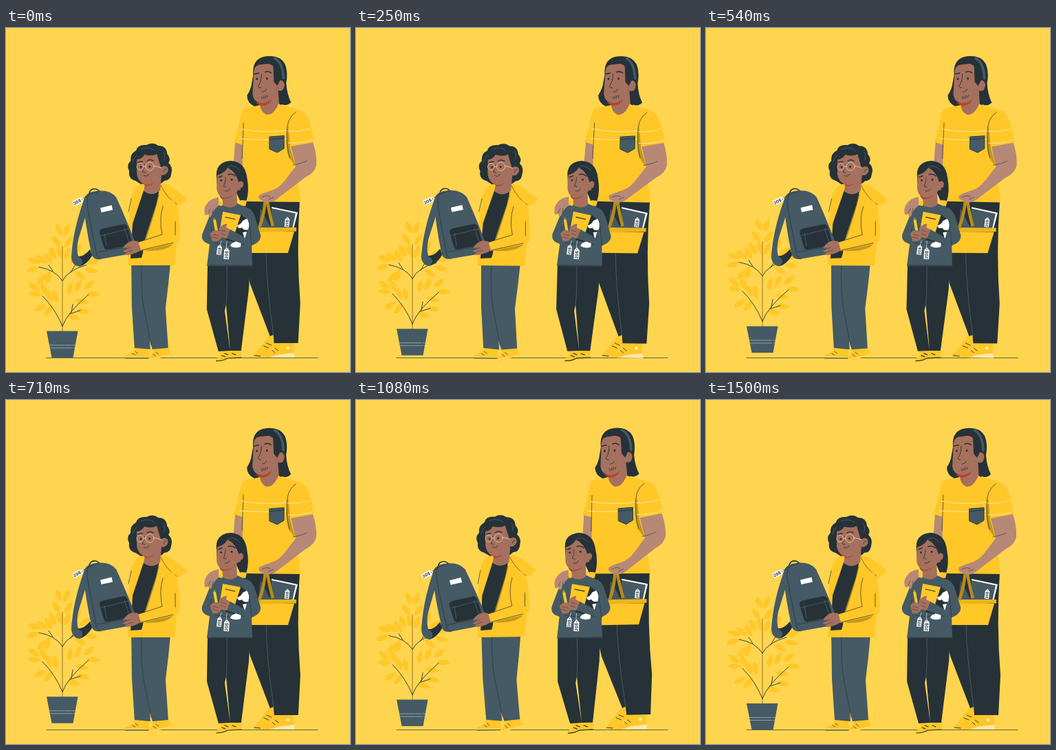
Write an HTML page that moves like this. It is 500x500 px and loops after 1540 ms.

```html
<!DOCTYPE html>
<html lang="en">
<head>
<meta charset="utf-8">
<title>School shopping</title>
<style>
html, body { margin: 0; height: 100%; overflow: hidden; background: #ffd54f }
svg { display: block; width: 100vw; height: 100vh }
.dark { fill: #263238 }
.slate { fill: #455a64 }
.gold { fill: #ffc727 }
.shade { fill: #c4981d }
.face { fill: #a5705d }
.skin { fill: #b78876 }
.red { fill: #b5442f }
.white { fill: #fff }
.ink, .pale, .grey { fill: none; stroke: #263238; stroke-width: .9; stroke-linecap: round; stroke-linejoin: round }
.pale { stroke: #ffebb0 }
.grey { stroke: #607580; stroke-width: .6 }
text { font: 700 6px Inter, Arial, sans-serif; text-anchor: middle; fill: #263238 }
</style>
</head>
<body>
<svg viewBox="0 0 500 500">
<defs>
  <path id="leaf" class="gold" d="M-10 0Q-2-8 10 0Q-2 8-10 0"/>
  <g id="tag">
    <path class="white" d="M-7-3.8H6L10 0L6 3.8H-7Z"/>
    <circle class="slate" cx="7.2" r=".8"/>
    <text y="2.2" x="-.8">20$</text>
  </g>
</defs>

<path class="ink" d="M59 479.5H453" style="stroke-width:.7"/>

<g id="plant">
  <g id="leaves"></g>
  <path class="ink" d="M82 441V318" style="stroke:#8a6d1f"/>
  <path class="ink" d="M82 368Q72 352 48 348M68 354L62 345M82 368Q90 352 117 345M94 356L101 344M82 434Q72 409 53 390M82 434Q89 414 120 388M93 416L108 411M95 414L97 402"/>
  <path class="slate" d="M59 441H104.500L97.500 479.500H66.500Z"/>
  <path class="pale" d="M63 461.500H101M64 465.500H100" stroke-dasharray="22 1 9 2" style="stroke:#b4bec3;stroke-width:.7"/>
</g>

<g id="father">
  <path class="skin" d="M333 164L345 168V212L330 204Z"/>
  <path class="gold" d="M361 475L384 446L395 445L393 462L369 479L362 478Z"/>
  <path class="gold" d="M391 457H418L420 479H372Q375 471 389 468Z"/>
  <path class="white" d="M395 475L419 472L420 479H382Q388 478 395 475Z" opacity=".6"/>
  <circle class="white" cx="410" cy="465" r="2"/>
  <path class="ink" d="M375 462L382 465M379 458L386 461M387 468L391 472M391 465L396 469M361 476L370 477"/>
  <path class="dark" d="M345 249L427 250Q422 325 428 400L425 458L390 458L389 446L384 448L355 372L347 330Z"/>
  <path class="grey" d="M378 326Q379 375 389 446"/>
  <path class="dark" d="M359 68Q357 47 373 42Q396 37 405 52Q410 64 407 80Q408 96 414 108Q408 114 401 111Q393 119 380 114Q370 120 361 114Q350 109 350 98Q356 89 357 79Z"/>
  <path class="face" d="M369 105L395 88L397 114Q391 127 378 126Q369 121 369 114Z"/>
  <path class="red" d="M362 108Q374 111 386 101Q384 113 370 113Z"/>
  <path class="face" d="M360 62Q361 53 372 53L386 51Q391 62 392 79Q397 74 402 77Q407 82 402 90Q397 93 392 89Q389 106 374 109Q360 110 358 96Z"/>
  <path class="dark" d="M364 54Q378 48 388 55L389 78L394 84L398 76L400 57L389 45Z"/>
  <path class="ink" d="M390 44Q402 50 403 73" style="stroke:#455a64;stroke-width:3.500"/>
  <path class="ink" d="M360 67L367 65.500M376 64Q381 62 385 65" style="stroke-width:1.600"/>
  <ellipse class="dark" cx="364.500" cy="74" rx="1.400" ry="1.800"/><ellipse class="dark" cx="379" cy="73.500" rx="1.400" ry="1.800"/>
  <path class="ink" d="M371 67Q371 78 366 85Q367 87 370 87M372 93Q377 93 378 89M371 100L372 103M374 99V102M377 98L376 102M380 98L379 101"/>
  <path class="gold" d="M369 112L346 117Q341 121 338 142L331 166L344 170L343 252L428 253Q425 220 418 199L413 173L448 165Q441 129 432 122Q424 117 402 113L396 110Q388 128 378 126Q370 122 369 112Z"/>
  <path class="shade" d="M410 141Q404 168 411 188L421 202L413 173Z"/>
  <path class="ink" d="M421 122Q407 131 408 155Q408 174 412 188M345 138L343 190" style="stroke-width:.7"/>
  <path class="pale" d="M342 147Q374 153 407 149M409 150Q427 151 441 146M339 161Q373 164 407 161M410 167Q430 168 446 162"/>
  <path class="slate" d="M383 158L404 156.500V175L394 181L383 176Z"/>
  <path class="ink" d="M383 162L404 160M383 158L404 156.500V175L394 181L383 176Z"/>
  <path class="slate" d="M370 262L385 291H367Z"/>
  <path class="white" d="M386 260L424 268L418 292H386Z"/>
  <path class="slate" d="M386 262L421 269.500L416 292H384Z"/>
  <use href="#tag" transform="translate(408.500 283)rotate(-84)scale(.85)"/>
  <path class="gold" d="M359 296H419L410 327H355Z"/>
  <path d="M357 290H422V295.500L357 297Z" fill="#edb51c"/>
  <path d="M377 246Q376 270 368 291M379 246Q383 272 388 288" fill="none" stroke="#b98b17" stroke-width="4.500"/>
  <path class="skin" d="M414 172L446 166Q452 184 451 199Q449 210 435 217L397 246Q390 253 380 254L372 251Q365 248 368 243Q374 240 383 237Q396 234 405 222L421 201Z"/>
  <path class="ink" d="M417 199Q429 197 437 193M372 246Q379 242 384 245M382 249L389 246" style="stroke-width:.6"/>
</g>

<g id="boy">
  <path class="gold" d="M186 464L207 466L209 479H173Q174 475 186 470Z"/>
  <path class="gold" d="M213 464L236 462L240 476Q226 479 211 483Q206 482 207 479Q217 474 213 464Z"/>
  <path class="pale" d="M174 478.500H206M209 481.500L239 475"/>
  <path class="ink" d="M184 473L188 475M188 470L192 473M214 474L218 477M218 471L222 474M174 480H207" style="stroke-width:.7"/>
  <path class="slate" d="M182 332L239 342L236 373L232 407L236 465L213 467L209 453L210 467L187 465L183 405Z"/>
  <path class="ink" d="M197 345Q196 385 201 410L211 461" style="stroke-width:.6"/>
  <path class="gold" d="M197 226Q185 231 182 246L178 285L177 345H197L216 270L225 226Z"/>
  <path class="dark" d="M200 236L223 234L218 260L197 334L181 335L184 284Z"/>
  <path class="gold" d="M225 226Q234 225 245 234L263 248Q256 258 246 258Q250 263 251 280L245 345H197L201 310L218 257Z"/>
  <path class="ink" d="M225 229Q233 246 248 256M222 242Q217 264 203 307" style="stroke-width:.6"/>
  <path class="shade" d="M195 322L244 312Q237 324 206 324Z"/>
  <path class="gold" d="M231 248Q246 248 249 262Q254 290 252 307Q250 313 242 314L195 324L190 312L226 301Z"/>
  <path class="ink" d="M228 259Q222 278 227 300L193 311M196 323L243 312M246 281V301M178 267L182 248" style="stroke-width:.7"/>
  <path class="dark" d="M188 222Q177 219 179 208Q174 200 181 193Q180 182 189 178Q191 169 204 170Q214 165 221 171Q233 171 234 183Q240 190 236 196Q243 202 240 212Q239 222 230 222Q223 230 214 224L196 227Z"/>
  <path class="face" d="M203 220L226 212L224 236Q212 246 200 237Z"/>
  <path class="red" d="M199 226L217 220Q215 229 203 230Z"/>
  <path class="face" d="M190 191Q197 191 201 184Q213 187 219 183Q222 193 225 203Q231 198 235 203Q237 209 231 213Q226 215 224 212Q218 227 205 228Q192 226 190 212Z"/>
  <path class="grey" d="M196 176Q207 171 216 178M228 179Q233 186 229 192M184 195Q185 188 190 185"/>
  <path class="ink" d="M192 195L198 194M205 193Q209 190 214 193" style="stroke-width:1.500"/>
  <circle class="dark" cx="196" cy="202" r="1.500"/><circle class="dark" cx="208.500" cy="201.500" r="1.500"/>
  <path class="ink" d="M201 198Q200 206 198 209L202 210M200 214Q205 217 208 212M229 209Q230 204 233 205" style="stroke-width:.8"/>
  <g class="pale" style="stroke:#edc4a4"><circle cx="195" cy="201.500" r="5"/><circle cx="209" cy="201" r="6"/><path d="M200 201H203M215 200L226 203"/></g>

  <path class="slate" d="M113 250Q97 295 95 333Q96 346 107 347Q116 345 126 330L122 322Q112 335 105 332Q102 323 105 308L119 262Z"/>
  <path class="dark" d="M104 332Q113 333 122 322L125 331Q117 344 108 346Q116 338 104 332Z"/>
  <path class="ink" d="M121 241C121 232 135 231 137 241" style="stroke-width:1.600"/>
  <path class="slate" d="M112 254Q114 240 126 238Q149 233 160 246Q174 276 190 317Q192 326 182 328L137 336Q126 338 124 327Q116 290 112 254Z"/>
  <path class="ink" d="M121 240Q116 248 119 264L131 326Q132 334 138 336M133 326L188 316" style="stroke-width:.7"/>
  <path class="white" d="M137 261.500L153.500 257.500L155 264.500L138.500 268Z"/>
  <path class="dark" d="M136 298Q135 293 141 291.500L169 285.500Q175 284 177 290L183 310Q184 315 179 316L149 322Q143 323 142 318Z"/>
  <path class="grey" d="M138 302L178 292M143 299L146 317M172 291L179 312"/>
  <path class="ink" d="M112 248Q121 241 136 237" style="stroke-width:.7"/>
  <use href="#tag" transform="translate(104 252.500)rotate(-27)"/>
  <path class="face" d="M170 320Q176 310 185 309L192 310L196 323Q187 329 175 330Q171 328 177 325Q170 327 170 324Q173 321 178 319Z"/>
  <path class="ink" d="M177 325L184 323M171 323L181 319" style="stroke-width:.5"/>
</g>

<g id="girl">
  <path class="gold" d="M309 468L326 467L328 479Q318 480 312 485L306 484Q304 481 313 475Z"/>
  <path class="gold" d="M327 467L342 468L343 478L320 482Q315 481 326 474Z"/>
  <path class="ink" d="M306 484Q316 484 322 480L342 479M314 476L319 478M318 473L323 475M329 473L334 475" style="stroke-width:1.200"/>
  <path class="dark" d="M293 345L355 344L353 380L342 469H326L320 402L318 411L326 469L309 470L292 409Z"/>
  <path class="grey" d="M321 347Q322 378 320 402"/>
  <path class="dark" d="M306 218Q303 195 326 193Q347 194 350 217Q354 237 349 252L340 251L335 240L312 247Q306 235 306 218Z"/>
  <path class="slate" d="M313 256Q300 260 295 275L285 300Q283 311 296 314L292 346L358 346L357 316Q371 311 370 301L363 278Q359 263 350 261L336 255Q325 264 313 256Z"/>
  <path class="face" d="M314 243L335 235L336 256Q327 265 315 257Z"/>
  <path class="red" d="M311 245L334 238Q328 249 314 249Z"/>
  <path class="face" d="M307 214Q317 211 322 203Q334 209 338 224Q343 220 345 226Q344 236 337 236Q331 246 317 247Q306 244 306 231Z"/>
  <path class="grey" d="M322 203Q329 196 340 207"/>
  <path class="dark" d="M341 232Q351 231 349 252L341 251Z"/>
  <path class="gold" d="M341 250L350 251L348 259L340 257ZM308 251L315 252L314 259L307 257Z"/>
  <path class="ink" d="M309 217L314 215M323 213Q328 211 333 215" style="stroke-width:1.500"/>
  <circle class="dark" cx="312.500" cy="221.500" r="1.500"/><circle class="dark" cx="328" cy="220.500" r="1.500"/>
  <path class="ink" d="M319 217Q319 225 316 230L320 231M318 237Q323 238 325 234" style="stroke-width:.8"/>
  <path class="ink" d="M299 290L296 314M357 316L354 288M304 313L325 315M295 345H357" style="stroke-width:.7"/>
  <path class="dark" d="M341 271L354 281L346 315L319 308L325 285Z"/>
  <path class="white" d="M350 277Q355 283 352 293Q345 295 343 290Q337 293 336 287Q342 285 344 280ZM337 302Q343 306 341 318Q333 321 326 317Q327 312 333 311ZM344 297L350 296L347 307Z"/>
  <path class="gold" d="M315 267L341 272L333 297L311 292Z"/>
  <path class="ink" d="M319 275L333 278" style="stroke-width:1.200"/>
  <path d="M303 279L308 307" stroke="#ffc727" stroke-width="4"/>
  <path class="shade" d="M301 279L302.500 275L305 278.500Z"/>
  <path class="face" d="M296 300Q299 294 306 294L314 298Q315 306 307 310L297 310Z"/>
  <path class="face" d="M310 291Q316 284 321 285L320 290L328 294Q327 303 321 306L312 304Q309 298 310 291Z"/>
  <path class="slate" d="M285 300L296 297L300 310L295 314ZM326 293L345 303L357 316L345 314L321 306Z"/>
  <path class="ink" d="M301 300L309 302M300 304L308 306M313 294L319 296M313 299L319 301" style="stroke-width:.5"/>
  <path class="ink" d="M311 316L313 309M320 320L321 310" style="stroke:#fff;stroke-width:.6"/>
  <use href="#tag" transform="translate(310 323.500)rotate(-83)scale(.88)"/>
  <use href="#tag" transform="translate(320.500 329)rotate(-87)"/>
</g>

<g id="hand">
  <path class="skin" d="M309 246Q296 248 291 257Q287 263 289 271Q291 274 294 270L295 274Q298 277 300 269L304 263L309 258Z"/>
  <path class="ink" d="M294 270L297 263M300 269L301 263" style="stroke-width:.5"/>
</g>
</svg>
<script>
const LOOP = 1540, LEAD = 40;
const byId = id => document.getElementById(id);

// x, y, angle
const leaves = [
  [77, 294, 65], [88, 294, -70], [73, 311, 55], [91, 311, -55], [68, 328, 62], [89, 328, -70], [78, 327, 75],
  [52, 337, 35], [39, 351, -18], [41, 339, 18], [52, 366, -50], [62, 335, 58], [61, 363, -75],
  [104, 322, -60], [115, 332, -35], [126, 340, -12], [124, 353, 12], [108, 360, 35], [98, 334, -70],
  [41, 377, 35], [42, 387, 5], [55, 380, 65], [63, 390, 65], [50, 407, -30], [62, 411, -50], [72, 391, 78],
  [93, 379, -80], [105, 375, -65], [121, 374, -40], [127, 387, 0], [111, 398, 12], [112, 412, 8], [99, 421, 15]
];
byId("leaves").innerHTML = leaves.map(([x, y, a]) =>
  `<use href="#leaf" transform="translate(${x} ${y})rotate(${a})"/>`).join("");

// id, pivot x, pivot y
const swaying = [["father", 370, 262], ["hand", 370, 262], ["boy", 180, 325], ["girl", 327, 338]];

// 0 to 1 at a quarter, to -1 at three quarters, back to 0
const sway = p => p < .25 ? 4 * p : p < .75 ? 2 - 4 * p : 4 * p - 4;

function draw(now) {
  const p = (now + LEAD) % LOOP / LOOP;
  const lift = 10 * (1 - Math.abs(2 * p - 1));
  byId("plant").setAttribute("transform", `translate(0 ${-lift})`);
  for (const [id, x, y] of swaying)
    byId(id).setAttribute("transform", `rotate(${sway(p)} ${x} ${y})`);
}

let start;
function tick(now) {
  start ??= now;
  draw(now - start);
  requestAnimationFrame(tick);
}
draw(0);
requestAnimationFrame(tick);
</script>
</body>
</html>
```
